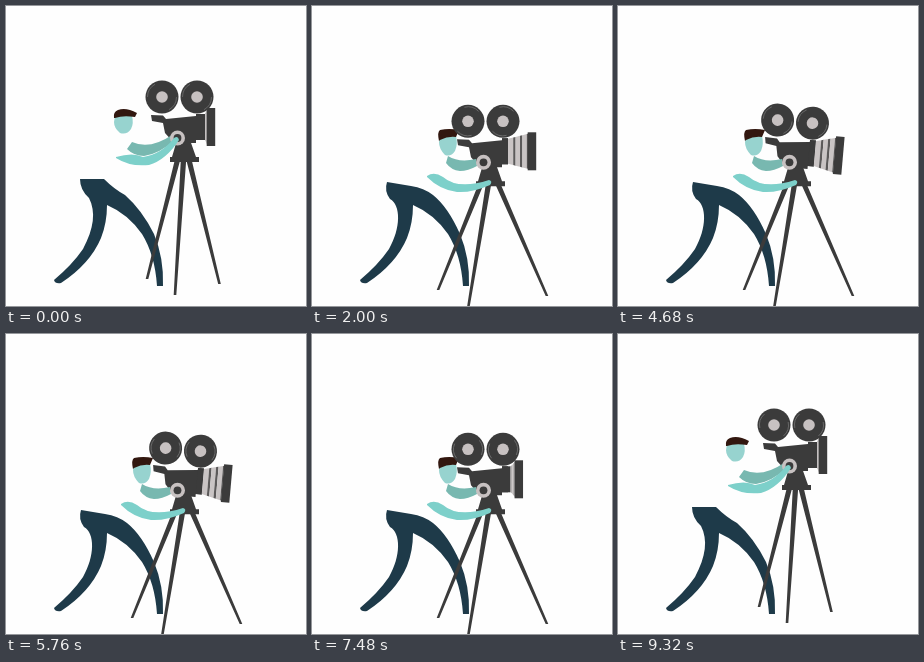
An HTML page that plays this animation: 300 by 300 pixels, repeating every 9.36 s.

```html
<!DOCTYPE html>
<html lang="en">
<head>
<meta charset="utf-8">
<title>Camera operator</title>
<style>
  html, body { margin: 0; height: 100%; overflow: hidden; background: #fefefe; }
  svg { display: block; width: 100vw; height: 100vh; }
  .dark { fill: #3b3b3b; }
  .light { fill: #c7c1c1; }
</style>
</head>
<body>
<svg viewBox="0 0 300 300">
  <path id="trousers" fill="#1e3a49"/>
  <path id="face" fill="#97d3cf"/>
  <path id="hair" fill="#32170f"/>
  <path id="legs" class="dark"/>
  <g id="mount" class="dark">
    <path d="M171 134H184L190 151H193V156H164V151H166Z"/>
  </g>
  <g id="camera">
    <g id="reels"></g>
    <path class="dark" d="M145 109L157 109.5L160 113L190 110V108H196V134H190V137H168L159 127L157 117L146 115Z"/>
    <rect id="block" class="dark" x="190" y="108" height="26"/>
    <g id="bellows"></g>
    <rect id="plate" class="dark" y="102" width="8.5" height="38"/>
  </g>
  <path id="farArm" fill="#78b8b0"/>
  <g id="knob">
    <circle class="light" cx="171.5" cy="132" r="7.5"/>
    <circle class="dark" cx="171.5" cy="132" r="3.9"/>
  </g>
  <path id="nearArm" fill="#7dd0ca"/>
</svg>
<script>
const LOOP = 9360;
const $ = id => document.getElementById(id);
const set = (id, name, value) => $(id).setAttribute(name, value);
const mix = (a, b, k) => a + (b - a) * k;

// Eased 0..1 over a time span
function ease(t, start, end) {
  const u = Math.min(1, Math.max(0, (t - start) / (end - start)));
  return u < .5 ? 2 * u * u : 1 - 2 * (1 - u) ** 2;
}
// Goes to 1 over the first span and back to 0 over the second
const trip = (t, a, b, c, d) => ease(t, a, b) - ease(t, c, d);

// Blends two paths that share the same commands
function morph(from, to, k) {
  const numbers = to.match(/[\d.]+/g);
  let i = 0;
  return from.replace(/[\d.]+/g, n => mix(+n, +numbers[i++], k).toFixed(2));
}

const trouserLegs = 'Q66 259 48 274Q49 278 55 277Q84 258 95 232Q101 217 101 199Q122 208 136 228Q149 249 151 280L157 280Q158 252 148 228';
const body = {
  trousers: {
    upright: `M74 173Q74 184 83 192C90 206 88 222 77 243${trouserLegs}Q136 204 119 189Q108 183 98 173Z`,
    leaning: `M75 176Q72 185 78 193C89 199 89 222 77 243${trouserLegs}Q136 201 121 189Q112 182 99 180Z`
  },
  face: {
    upright: 'M109 110L126 110Q128 117 125 123Q121 129 114 127Q108 122 108 116Z',
    leaning: 'M128 131L144 130Q146 138 143 145Q139 151 133 149Q127 143 127 136Z'
  },
  hair: {
    upright: 'M108 112Q107 106 112 104Q120 101 131 107L129 111Q117 109 109 112Z',
    leaning: 'M127 135Q125 126 128 124Q137 122 147 124L144 131Q136 130 128 134Z'
  }
};
const arms = {
  farArm: {
    knob: 'M126 136Q144 144 166 129L169 134Q153 148 138 150Q128 150 121 143Z',
    tripod: 'M125 140Q146 148 163 133L166 137Q152 152 138 154Q127 155 120 147Z',
    leaning: 'M136 150Q147 157 164 153L165 160Q156 165 148 165Q139 164 134 157Z'
  },
  nearArm: {
    knob: 'M110 151Q127 146 137 151Q156 148 168 132Q172 129 173 134Q160 154 143 159Q124 161 110 152Z',
    tripod: 'M107 150Q116 149 131 156Q150 160 176 152Q180 153 177 157Q155 167 137 166Q118 163 107 151Z',
    leaning: 'M115 170Q122 165 131 171Q146 184 177 174Q181 175 178 179Q160 187 145 186Q128 184 115 171Z'
  }
};
// Top x, foot x and foot y for the high tripod, then for the low one
const tripodLegs = [
  [171.5, 141, 273, 169, 126, 284],
  [177.5, 169, 289, 176.5, 156.5, 300],
  [183, 213.5, 278, 186, 235, 290]
];

$('reels').innerHTML = [156, 191].map(x => `
  <g transform="translate(${x} 91)">
    <circle class="dark" r="16.5"/>
    <path class="sheen" d="M-14.5 0A14.5 14.5 0 0 1 -7 -12.7M14.5 0A14.5 14.5 0 0 1 7 12.7"
      fill="none" stroke="#777" stroke-width=".7"/>
    <circle class="light" r="5.8"/>
  </g>`).join('');
const sheens = document.querySelectorAll('.sheen');

function drawBellows(extend) {
  const left = mix(199, 196, extend), right = 201 + 15 * extend;
  set('block', 'width', left - 190);
  set('plate', 'x', right - .3);
  const stops = [0, .26, .38, .6, .72, .94, 1];
  const edge = k => [mix(left, right, k), mix(12.5, 17.5, k)];
  let stripes = '';
  for (let i = 0; i < 6; i++) {
    const [x1, h1] = edge(stops[i]);
    const [x2, h2] = edge(stops[i + 1]);
    stripes += `<path fill="${i % 2 ? '#5c5a5a' : '#c9c4c4'}" d="M${x1} ${121 - h1}L${x2} ${121 - h2}V${121 + h2}L${x1} ${121 + h1}Z"/>`;
  }
  $('bellows').innerHTML = stripes;
}

function draw(t) {
  const reach = trip(t, 250, 700, 8200, 8700);
  const lean = trip(t, 730, 1290, 7590, 8150);
  const extend = trip(t, 1250, 1700, 7150, 7590);
  const tilt = 5 * trip(t, 3000, 3600, 5900, 6500);
  const drop = 24.3 * lean;

  for (const [id, pose] of Object.entries(body))
    set(id, 'd', morph(pose.upright, pose.leaning, lean));
  for (const [id, pose] of Object.entries(arms))
    set(id, 'd', morph(morph(pose.knob, pose.tripod, reach), pose.leaning, lean));

  set('legs', 'd', tripodLegs.map(([highTop, highX, highY, lowTop, lowX, lowY]) => {
    const x = mix(highTop, lowTop, lean), top = 154 + drop;
    const footX = mix(highX, lowX, lean), footY = mix(highY, lowY, lean);
    return `M${x - 2.7} ${top}H${x + 2.7}L${footX + 1.3} ${footY}H${footX - 1.3}Z`;
  }).join(''));
  set('mount', 'transform', `translate(0 ${drop})`);
  set('knob', 'transform', `translate(0 ${drop})`);
  set('camera', 'transform', `translate(0 ${drop}) rotate(${tilt} 171.5 132)`);
  drawBellows(extend);
  sheens.forEach(s => s.setAttribute('transform', `rotate(${t / LOOP * 360 * 8})`));
}

function frame() {
  draw(performance.now() % LOOP);
  requestAnimationFrame(frame);
}
frame();
</script>
</body>
</html>
```
